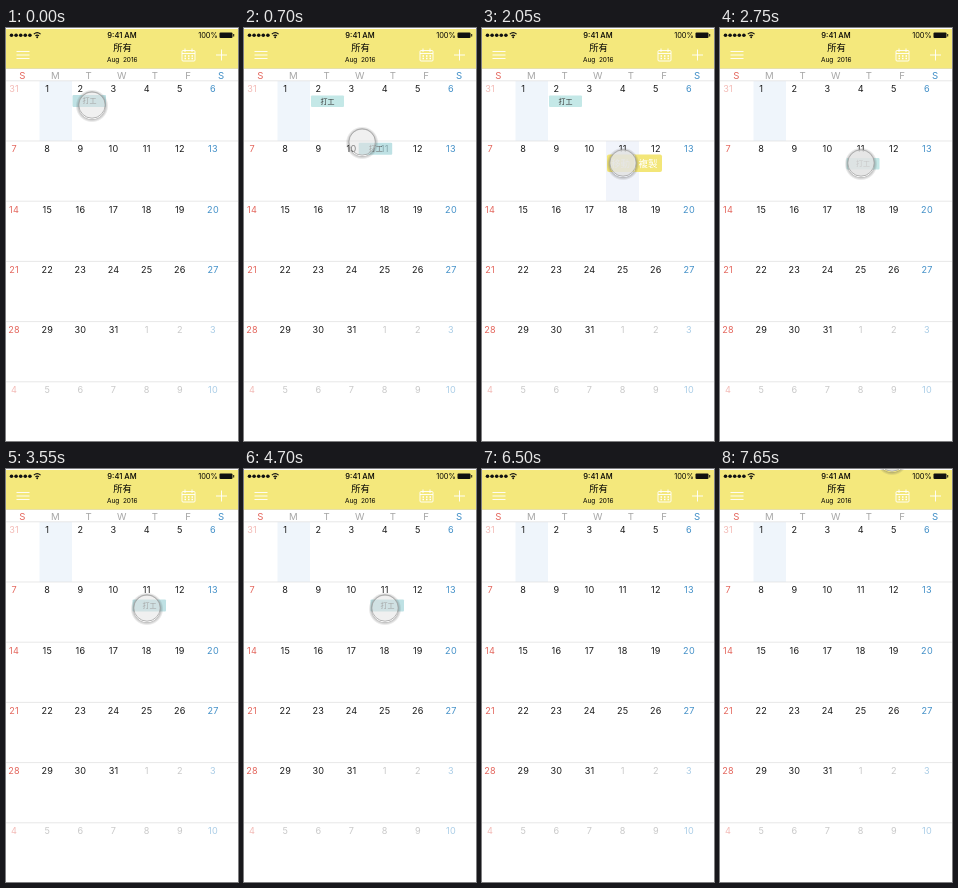
Recreate the animation shown at these times as an HTML page. Size 232x413 px, loop 7700 ms.

```html
<!DOCTYPE html>
<html lang="zh-Hant">
<head>
<meta charset="utf-8">
<title>Calendar</title>
<style>
  html, body { margin: 0; width: 100%; height: 100%; overflow: hidden; background: #fff; }
  svg { display: block; width: 232px; height: 413px; }
  text { font-family: Inter, "Noto Sans CJK TC", "Noto Sans CJK", sans-serif; text-anchor: middle; }
  .label { font-size: 7px; fill: #333; }
  .date { font-size: 9.1px; letter-spacing: .25px; }
</style>
</head>
<body>
<svg viewBox="0 0 232 413">
  <defs>
    <radialGradient id="shadow">
      <stop offset=".78" stop-color="#555" stop-opacity="0"/>
      <stop offset=".82" stop-color="#555" stop-opacity=".35"/>
      <stop offset="1" stop-color="#555" stop-opacity="0"/>
    </radialGradient>
  </defs>
  <rect width="232" height="413" fill="#fff"/>
  <rect x="33.5" y="53" width="32.5" height="60" fill="#eff5fb"/>
  <rect id="target" x="124" y="113" width="33" height="60" fill="#f1f4fb"/>
  <g id="grid"></g>

  <rect y="1" width="232" height="39.5" fill="#f4e87c"/>
  <path d="M0 40.5H232" stroke="#d9d3a0" stroke-width=".6"/>
  <g id="signal" fill="#111"></g>
  <g fill="none" stroke="#111" stroke-width="1.1">
    <path d="M27.8 6.2Q31.2 3 34.6 6.2M29.4 7.9Q31.2 6.2 33 7.9"/>
    <circle cx="31.2" cy="9.2" r=".4"/>
  </g>
  <text x="116" y="9.8" font-size="7.6" font-weight="500">9:41 AM</text>
  <text x="202" y="9.8" font-size="7.4">100%</text>
  <rect x="213.5" y="4.5" width="13" height="5.5" rx="1" fill="#111"/>
  <rect x="227.2" y="6" width="1" height="2.5" fill="#111"/>
  <text x="116.5" y="22.8" font-size="9.3">所有</text>
  <text x="116.3" y="34" font-size="6.5" xml:space="preserve">Aug  2016</text>
  <g fill="none" stroke="#fff" stroke-width=".9">
    <path d="M10.5 23.5H23.5M10.5 27H23.5M10.5 30.5H23.5M210 27H221M215.5 21.5V32.5"/>
    <rect x="176" y="22.5" width="13" height="10.5" rx="1"/>
    <path d="M179 20.5V24M186 20.5V24M176 25.5H189"/>
    <path d="M178.5 28H187M178.5 30.5H187" stroke-width="1.3" stroke-dasharray="1.5 2"/>
  </g>

  <g id="resting">
    <rect width="33" height="11.5" rx="1" fill="#c4e8e7"/>
    <text class="label" x="16.5" y="8">打工</text>
  </g>
  <g id="lifted">
    <rect width="33.5" height="12" rx="1" fill="#a9d7dc"/>
    <text class="label" x="17" y="8.4">打工</text>
  </g>
  <g id="popup">
    <rect x="125" y="126.5" width="55" height="17.5" rx="2" fill="#f3e678"/>
    <path d="M152.5 127V144" stroke="#fff" stroke-width=".6"/>
    <g fill="#fff" font-size="9.5">
      <text x="138.5" y="138.7">移動</text>
      <text x="166" y="138.7">複製</text>
    </g>
  </g>
  <g id="pointer">
    <circle id="halo" cy="1" r="16.5" fill="url(#shadow)"/>
    <circle id="disc" r="13.2" fill="#e2e2e2" stroke="#a2a2a2" stroke-width=".8"/>
  </g>
</svg>
<script>
const LOOP = 7700, COL = 33.15, ROW = 60.2;
const RED = '#e4685f', BLUE = '#4390c8';
const $ = id => document.getElementById(id);

function add(parent, tag, attrs, text = '') {
  const node = document.createElementNS('http://www.w3.org/2000/svg', tag);
  for (const key in attrs) node.setAttribute(key, attrs[key]);
  node.textContent = text;
  parent.append(node);
}

const dayColor = (col, weekday) => col === 0 ? RED : col === 6 ? BLUE : weekday;

function buildCalendar() {
  const grid = $('grid');
  [...'SMTWTFS'].forEach((day, col) => add(grid, 'text', {
    x: 16.3 + col * COL, y: 50.8, 'font-size': 9.6, fill: dayColor(col, '#a6a6a6')
  }, day));
  for (let day = 0; day < 42; day++) {
    const col = day % 7, row = Math.floor(day / 7);
    const outside = day < 1 || day > 31;
    if (col === 0) add(grid, 'path', {
      d: `M0 ${52.8 + row * ROW}H232`, stroke: '#dedede', 'stroke-width': .7
    });
    add(grid, 'text', {
      class: 'date', x: 8.1 + col * COL, y: 64.2 + row * ROW,
      fill: dayColor(col, outside ? '#888' : '#1c1c1c'), opacity: outside ? .45 : 1
    }, (day + 30) % 31 + 1);
  }
  for (let i = 0; i < 5; i++) add($('signal'), 'circle', { cx: 5.5 + i * 4.6, cy: 7.2, r: 1.8 });
}

const ramp = (t, from, to) => Math.min(1, Math.max(0, (t - from) / (to - from)));
const smooth = (t, from, to) => {
  const u = ramp(t, from, to);
  return u * u * (3 - 2 * u);
};
// Fades in after one moment and out after another.
const between = (t, start, end, fadeTime = 150) =>
  ramp(t, start, start + fadeTime) - ramp(t, end, end + fadeTime);

const place = (id, x, y) => $(id).setAttribute('transform', `translate(${x} ${y})`);
const fade = (id, value) => $(id).setAttribute('opacity', value);

function draw(t) {
  const drag = smooth(t, 200, 900);
  const choose = smooth(t, 1150, 1700);
  const press = smooth(t, 3000, 3400);
  const flick = 1 - (1 - ramp(t, 5200, 6000)) ** 3;
  const leave = smooth(t, 5650, 6400);
  const enter = smooth(t, 7100, 7600);

  place('pointer',
    86 + 40 * drag + 15 * choose + 31 * leave,
    77 + 46 * drag + 12 * choose + 4 * press - 169 * leave + 19 * enter);
  const held = t < 900 || (t > 3250 && t < 5200);
  $('disc').setAttribute('fill-opacity', held ? .5 : .85);
  fade('halo', t > 5200 && t < 7000 ? 0 : 1);

  place('lifted', 66.5 + 60 * drag - 30 * flick, 67 + 59.5 * drag + 4 * press - 150 * flick);
  fade('lifted', .75 * (between(t, -200, 980) + between(t, 3150, LOOP)));

  const moved = t >= 2350;
  place('resting', moved ? 126.5 : 67, moved ? 130 : 67.5);
  fade('resting', t >= 200 && t < 3250 ? 1 : 0);
  fade('popup', between(t, 880, 2250));
  fade('target', between(t, 1200, 2300));
}

buildCalendar();
const start = performance.now();
(function tick() {
  draw((performance.now() - start) % LOOP);
  requestAnimationFrame(tick);
})();
</script>
</body>
</html>
```
